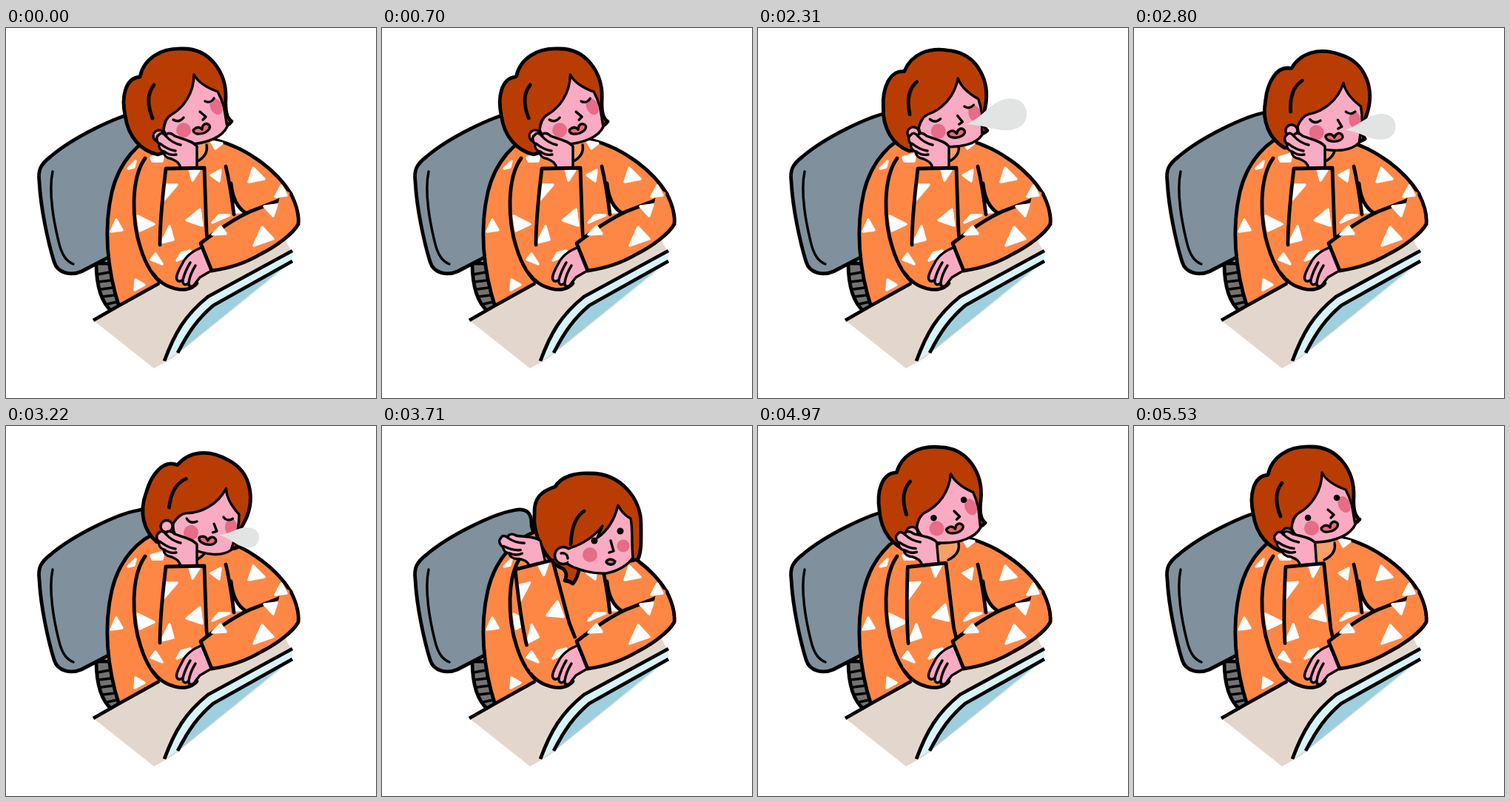
An HTML page for the animation above (5600 ms loop, 500 by 500 pixels).

```html
<!DOCTYPE html>
<html lang="en">
<head>
<meta charset="utf-8">
<title>Dozing at the desk</title>
<style>
  html, body { margin: 0; width: 100%; height: 100%; overflow: hidden; background: #fff; }
  svg { display: block; width: 100vw; height: 100vh; }
  .ink { stroke: #000; stroke-width: 4.8; stroke-linecap: round; stroke-linejoin: round; }
  .thin { stroke-width: 3.4; }
  .line { fill: none; }
  .hair { fill: #b93d02; }
  .skin { fill: #f9abc3; }
  .coat { fill: #ff8745; }
  .blush { fill: #e66c87; }
  .lips { fill: #ee6777; }
  .dots { fill: #fff; stroke: #fff; stroke-width: 3.4; stroke-linejoin: round; }
</style>
</head>
<body>
<svg viewBox="0 0 500 500">
  <!-- chair -->
  <path class="ink" fill="#737373" d="M122 318C122 345 128 370 143 383L156 374L140 318Z"/>
  <path class="ink thin line" d="M124 333L140 330M125 343L142 341M128 353L144 351M131 363L147 361M137 373L151 370"/>
  <path class="ink" fill="#80909d" d="M210 160L202 135C203 116 194 110 178 114C150 119 90 148 60 174C46 185 43 192 45 208C47 245 57 290 65 316C70 332 88 335 102 329L150 304Z"/>
  <path class="ink thin line" d="M63 194C57 222 65 264 71 288C75 306 81 315 91 319"/>

  <!-- body -->
  <path class="ink coat" d="M153 377C136 325 132 270 143 222C153 180 180 152 207 143L282 151C330 163 368 196 385 224L394 260L310 290L210 350Z"/>
  <path class="dots" d="M165 190L175 180L173 188ZM196 175L213 170L211 180L198 180ZM142 275L149 259L157 273ZM178 254L200 265L181 274ZM175 340L187 347L174 354ZM277 153L292 156L283 163ZM290 192L277 199L288 207ZM334 189L349 204L328 208ZM279 263L288 253L302 253Z"/>
  <path fill="#f7a069" d="M236 150L270 156C273 168 266 176 256 182L236 182Z"/>
  <path class="ink thin line" d="M271 158C273 168 267 176 257 181"/>
  <path fill="#fff" d="M308 232L320 250L309 251Z"/>
  <path class="ink line" d="M297 187C303 212 305 228 308 252M304 210C306 230 313 243 324 250"/>
  <path class="ink line" d="M188 176C168 204 170 262 182 298C189 320 200 338 214 348"/>

  <!-- desk -->
  <path fill="#e3d7cd" d="M118 395L205 346L262 335L377 286L387 304L387 316L225 446L200 460Z"/>
  <path fill="#d7f3f8" d="M386 301L273 363C242 388 228 412 213 451L230 440L387 316Z"/>
  <path fill="#9dcfde" d="M386 315L280 375C258 394 245 412 232 439Z"/>
  <path class="ink line" style="stroke-linecap:butt" d="M118 395L153 375L207 345M387 301L273 363C242 388 228 412 214 450M387 315L280 375C259 393 247 410 232 439"/>

  <!-- leaning head -->
  <g id="sleepy">
    <path class="ink hair" d="M205 171C183 166 165 148 161 118C156 95 160 68 181 66C186 42 208 27 238 28C275 27 298 60 297 95C296 112 298 122 305 126C300 133 293 134 288 134L240 160Z"/>
    <path class="ink thin skin" d="M254 63C254 88 240 108 222 118C216 122 214 128 213 138C218 152 232 158 248 157C272 156 293 147 299 133C296 122 297 106 286 86C272 81 260 74 254 63Z"/>
    <path class="ink line" d="M200 77C191 88 190 102 198 122"/>
    <circle class="ink thin skin" cx="207" cy="146" r="8"/>
    <circle class="blush" cx="240" cy="138" r="10"/>
    <ellipse class="blush" cx="284" cy="106" rx="8" ry="11.5" transform="rotate(-25 284 106)"/>
    <path class="ink thin line" d="M262 113L270 120L266 124"/>
    <path class="ink thin lips" d="M254 137C258 133 262 134 265 137C265 131 269 128 273 130C280 134 271 144 258 143C254 142 252 139 254 137Z"/>
    <path id="shut" class="ink thin line" d="M226 124C231 127 236 126 240 121M269 99C273 101 278 100 281 95"/>
    <g id="open"><circle cx="235" cy="124" r="4.3"/><circle cx="274" cy="97" r="4.3"/></g>
    <path id="bubble" fill="#e2e3e3" d="M0 0C28 -5 38 -22 62 -21C76 -20 84 -12 84 0C84 12 76 21 62 21C40 22 28 6 0 0Z"/>
  </g>

  <!-- startled head -->
  <g id="awake">
    <path class="ink hair" d="M247 209C250 203 249 197 245 193C222 184 203 148 206 118C205 98 215 88 234 82C242 68 262 63 280 64C322 63 350 98 350 132C350 155 351 168 346 180L338 182L300 180L266 194C265 202 262 208 258 213C254 210 251 209 247 209Z"/>
    <path class="ink thin skin" d="M319 107C314 128 304 142 291 151L298 135C286 150 270 160 254 165L250 186C262 194 285 200 303 199C320 196 333 187 339 178C337 155 339 140 336 125C330 122 323 115 319 107Z"/>
    <circle class="ink thin skin" cx="245" cy="175" r="11.5"/>
    <path class="skin" d="M250 168L261 165L261 190L252 185Z"/>
    <path class="ink thin line" d="M242 172C247 171 251 174 251 179"/>
    <path class="ink line" d="M273 115C262 122 256 137 255 160"/>
    <circle class="blush" cx="281" cy="174" r="10"/>
    <circle class="blush" cx="326" cy="162" r="8.5"/>
    <circle cx="287" cy="155" r="4.5"/><circle cx="322" cy="142" r="4.5"/>
    <path class="ink thin line" d="M309 155L313 169L307 171"/>
    <path class="ink thin" fill="#c96878" d="M303 184C304 179 311 179 315 183C314 188 306 189 303 184Z"/>
  </g>

  <!-- left arm -->
  <path class="coat" d="M196 325L262 322L258 345C250 355 233 357 215 346Z"/>
  <path class="ink line" d="M198 331C213 353 245 361 258 345"/>
  <g id="arm">
    <path class="ink thin skin" d="M236 190C235 183 231 180 224 177C217 176 213 172 213 167C208 165 206 161 207 157C203 153 202 147 207 144C209 141 213 142 216 146C217 141 223 141 228 146C238 150 252 152 258 160L258 190Z"/>
    <path class="ink thin line" d="M216 146C221 152 228 156 236 158M208 156C214 161 222 165 229 166M214 167C219 171 225 172 230 171"/>
    <path class="coat" d="M216 190L268 189L272 280L258 335L205 330L208 290Z"/>
    <path class="dots" d="M215 212L231 212L212 234ZM248 191L261 192L252 206ZM262 245L265 267L244 260ZM221 268L226 286L210 290Z"/>
    <path class="ink line" d="M208 293C208 255 212 225 216 190L268 189L271 277L274 297"/>
  </g>
  <path class="dots" d="M202 305L211 319L196 313ZM231 314L237 304L249 301L245 309Z"/>

  <!-- right sleeve and hand -->
  <path class="ink thin skin" d="M266 296C252 301 243 308 238 319C233 328 229 336 231 340C233 344 237 342 239 340C238 347 243 349 247 344C246 350 252 351 255 346L262 337L279 327Z"/>
  <path class="ink thin line" d="M249 317C244 325 241 333 239 340M256 321C251 329 248 337 247 344"/>
  <path class="ink coat" d="M263 291C285 274 312 256 330 248L366 234L385 224C393 240 396 255 395 265C388 278 365 295 345 305C325 317 300 325 278 328Z"/>
  <path class="coat" d="M368 236L372 218L383 222L386 250Z"/>
  <path class="dots" d="M349 241L366 239L361 254ZM346 269L361 285L335 294ZM290 268L297 278L279 279ZM372 213L379 226L364 228Z"/>
</svg>
<script>
const LOOP = 5600, STEP = 70, SLIP = 3290, RISE = 4830;
const el = id => document.getElementById(id);
const turn = (id, deg, x, y) => el(id).setAttribute('transform', `rotate(${deg} ${x} ${y})`);
const show = (id, on) => { el(id).style.display = on ? '' : 'none'; };

// [time, value] pairs, eased between neighbours
function track(keys, t) {
  const i = keys.findIndex(k => k[0] > t);
  if (i < 0) return keys[keys.length - 1][1];
  if (i === 0) return keys[0][1];
  const [a, from] = keys[i - 1], [b, to] = keys[i];
  const u = (t - a) / (b - a);
  return from + (to - from) * u * u * (3 - 2 * u);
}

const armKeys = [[3220, 0], [3430, -13], [4690, -13], [5040, -4]];
const riseKeys = [[4760, 24], [5040, 0]];
const nodKeys = [[3780, 0], [4270, 13], [4620, 13], [4830, 2]];
const breath = [[700, 0], [1400, 0.62], [2310, 1], [3290, 0.64]];

function draw(t) {
  const asleep = t < SLIP, up = t >= RISE;
  show('sleepy', asleep || up);
  show('awake', !asleep && !up);
  show('shut', asleep);
  show('open', !asleep);
  turn('sleepy', asleep ? 28 * (t / 3220) ** 3.2 : track(riseKeys, t), 233, 161);
  turn('awake', track(nodKeys, t), 226, 153);
  turn('arm', track(armKeys, t), 215, 350);
  const size = track(breath, t);
  show('bubble', asleep && size > 0);
  el('bubble').setAttribute('transform', `translate(275 123) rotate(-23) scale(${size})`);
}

const start = performance.now();
function tick(now) {
  const t = Math.max(0, now - start) % LOOP;
  draw(Math.floor(t / STEP) * STEP);
  requestAnimationFrame(tick);
}
draw(0);
requestAnimationFrame(tick);
</script>
</body>
</html>
```
